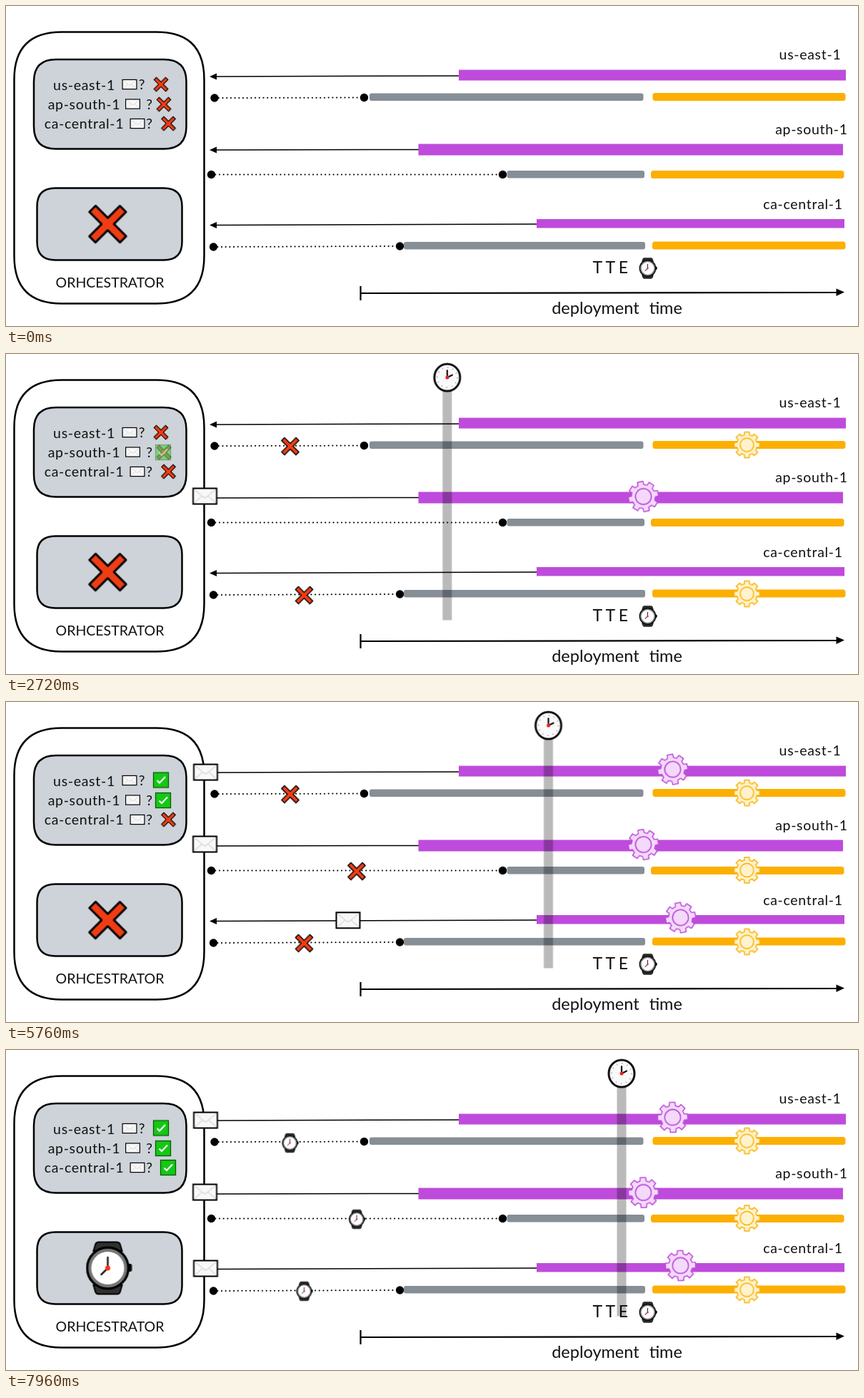
An HTML page that plays this animation: 1193 px wide and 449 px high, repeating every 8000 ms.

```html
<!DOCTYPE html>
<html lang="en">
<head>
<meta charset="utf-8">
<title>Deployment timeline</title>
<style>
html, body { margin: 0; width: 100%; height: 100%; overflow: hidden; background: #fff; }
svg { display: block; width: 1193px; height: 449px; }
text { font: 19.5px Lato, sans-serif; letter-spacing: .7px; text-anchor: middle; fill: #111; }
.caps { letter-spacing: 0; }
.tte { font-size: 23px; letter-spacing: 4.5px; }
.axis { font-size: 23.5px; letter-spacing: 0; word-spacing: 8px; }
.ink { fill: none; stroke: #000; }
.box { stroke: #000; stroke-width: 2.5; fill: #cdd3d8; }
.task { fill: #be4bdb; }
.wait { fill: #868e96; }
.done { fill: #fcaf00; }
.dots { fill: none; stroke: #000; stroke-width: 2; stroke-linecap: round; stroke-dasharray: .2 5.5; }
.gold { fill: #fff3cd; stroke: #fab005; }
.plum { fill: #f3d9fa; stroke: #be4bdb; }

/* Every animation shares one 8 s cycle. */
.a { animation: 8s linear infinite both; }
.spin { animation: spin 8s linear infinite; }
@keyframes spin { to { transform: rotate(360deg); } }

.clock { animation-name: sweep, clock-in; }
@keyframes sweep { from { transform: translateX(491px); } to { transform: translateX(863.8px); } }
@keyframes clock-in { 0%, .4% { opacity: 0; } 5.5%, 100% { opacity: 1; } }

.us-x { animation-name: us-x; }
.us-gold { animation-name: us-gold; }
.ca-x { animation-name: ca-x; }
.ca-gold { animation-name: ca-gold; }
.ap-x { animation-name: ap-x; }
.ap-gold { animation-name: ap-gold; }
@keyframes us-x { 0%, 1.6% { opacity: 0; } 6.6%, 100% { opacity: 1; } }
@keyframes us-gold { 0%, 4.6% { opacity: 0; } 9.6%, 100% { opacity: 1; } }
@keyframes ca-x { 0%, 13% { opacity: 0; } 18%, 100% { opacity: 1; } }
@keyframes ca-gold { 0%, 16% { opacity: 0; } 21%, 100% { opacity: 1; } }
@keyframes ap-x { 0%, 55.2% { opacity: 0; } 60.2%, 100% { opacity: 1; } }
@keyframes ap-gold { 0%, 58.2% { opacity: 0; } 63.7%, 100% { opacity: 1; } }

.ap-on { animation-name: ap-on; }
.us-on { animation-name: us-on; }
.ca-on { animation-name: ca-on; }
@keyframes ap-on { 0%, 13.9% { opacity: 0; } 20.1%, 100% { opacity: 1; } }
@keyframes us-on { 0%, 34.2% { opacity: 0; } 40.5%, 100% { opacity: 1; } }
@keyframes ca-on { 0%, 59.6% { opacity: 0; } 65.9%, 100% { opacity: 1; } }

.ap-mail { animation-name: ap-mail, ap-on; }
.us-mail { animation-name: us-mail, us-on; }
.ca-mail { animation-name: ca-mail, ca-on; }
.mail { animation-timing-function: cubic-bezier(.35, 0, .65, 1), linear; }
@keyframes ap-mail { 0%, 20.1% { transform: translate(577px, 199.5px); } 31.4%, 100% { transform: translate(278.5px, 199.5px); } }
@keyframes us-mail { 0%, 40.8% { transform: translate(634px, 97px); } 52%, 100% { transform: translate(279.5px, 98.5px); } }
@keyframes ca-mail { 0%, 65.9% { transform: translate(743.5px, 306px); } 77.1%, 100% { transform: translate(279.5px, 306.5px); } }

.ap-ok { animation-name: ap-ok; }
.us-ok { animation-name: us-ok; }
.ca-ok { animation-name: ca-ok; }
@keyframes ap-ok { 0%, 31.4% { opacity: 0; } 37.6%, 100% { opacity: 1; } }
@keyframes us-ok { 0%, 51.8% { opacity: 0; } 58%, 100% { opacity: 1; } }
@keyframes ca-ok { 0%, 76.6% { opacity: 0; } 82.6%, 100% { opacity: 1; } }

.ap-no { animation-name: ap-no; }
.us-no { animation-name: us-no; }
.ca-no { animation-name: ca-no; }
@keyframes ap-no { 0%, 31.4% { opacity: 1; } 37.6%, 100% { opacity: 0; } }
@keyframes us-no { 0%, 51.8% { opacity: 1; } 58%, 100% { opacity: 0; } }
@keyframes ca-no { 0%, 76.6% { opacity: 1; } 82.6%, 100% { opacity: 0; } }
</style>
</head>
<body>
<svg viewBox="0 0 1193 449">
  <defs>
    <path id="cross" transform="rotate(45)" fill="#f03c14" stroke="#000" stroke-width="5.5" stroke-linejoin="round"
      d="M-11-55H11V-11H55V11H11V55H-11V11H-55V-11H-11Z"/>
    <g id="check">
      <rect x="-10.5" y="-10.5" width="21" height="21" fill="#14c814" stroke="#0b5a0b" stroke-width="1.3"/>
      <path d="M-5.5 .5L-2 4L6-4.5" fill="none" stroke="#fff" stroke-width="2.2"/>
    </g>
    <g id="mail">
      <rect x="-16.5" y="-11" width="33" height="22" fill="#f8f8f8" stroke="#000" stroke-width="2"/>
      <path d="M-15-9.5L-2 1.5Q0 3 2 1.5L15-9.5M-15 9.5L-4.5 0M15 9.5L4.5 0" fill="none" stroke="#c4c4c4"/>
    </g>
    <g id="watch">
      <path d="M-13-36.5H13Q17-36.5 18-31L20-24H-20L-18-31Q-17-36.5-13-36.5ZM-13 36.5H13Q17 36.5 18 31L20 24H-20L-18 31Q-17 36.5-13 36.5Z"
        fill="#303030" stroke="#000" stroke-width="2"/>
      <rect x="26" y="-6" width="7.5" height="11" rx="2"/>
      <circle r="29" fill="#333" stroke="#000" stroke-width="3"/>
      <circle r="25" fill="#fff" stroke="#777" stroke-width="4"/>
      <path d="M0 0V-15M0 0L-9 9" stroke="#222" stroke-width="2.6" stroke-linecap="round"/>
      <circle r="3.5" fill="#f8301c"/>
    </g>
    <g id="gear">
      <path id="teeth"/>
      <circle r="9.5"/>
    </g>
    <path id="head" d="M0 0L10-4.5V4.5Z"/>
  </defs>

  <path class="box" style="fill:#fff"
    d="M78 36.5H211Q277.500 36.500 277.500 103V351Q277.500 417.500 211 417.500H78Q11.500 417.500 11.500 351V103Q11.500 36.500 78 36.500Z"/>
  <path class="box" d="M70 75H221Q252.500 75 252.500 106V169Q252.500 200.500 221 200.500H70Q39 200.500 39 169V106Q39 75 70 75Z"/>
  <path class="box" d="M69 255.500H221Q246.500 255.500 246.500 281V331Q246.500 356.500 221 356.500H69Q43.500 356.500 43.500 331V281Q43.500 255.500 69 255.500Z"/>
  <text x="145.5" y="394.5" class="caps">ORHCESTRATOR</text>

  <text x="109.5" y="117.5">us-east-1</text>
  <text x="109.5" y="145">ap-south-1</text>
  <text x="109.5" y="172">ca-central-1</text>
  <text x="190.5" y="117">?</text>
  <text x="201" y="144.5">?</text>
  <text x="201" y="171.5">?</text>
  <use href="#mail" transform="translate(173 110)scale(.6)"/>
  <use href="#mail" transform="translate(177.5 137.5)scale(.6)"/>
  <use href="#mail" transform="translate(184 165)scale(.6)"/>

  <text x="1126" y="75">us-east-1</text>
  <text x="1128" y="179.5">ap-south-1</text>
  <text x="1116" y="285">ca-central-1</text>

  <path class="ink" stroke-width="1.5" d="M634 98L290 99M578 201.5L290 202M744 306L290 307.5"/>
  <use href="#head" x="285" y="99"/>
  <use href="#head" x="285" y="202"/>
  <use href="#head" x="285" y="307.5"/>

  <path class="dots" d="M292 129L502 128.5M287.5 236.5H695.5M290.5 338L551.5 337"/>
  <g>
    <circle cx="292" cy="129" r="5.7"/><circle cx="501.5" cy="128.5" r="5.7"/>
    <circle cx="287.5" cy="236.5" r="5.7"/><circle cx="695.5" cy="236.5" r="5.7"/>
    <circle cx="290.5" cy="338" r="5.7"/><circle cx="551.5" cy="337" r="5.7"/>
  </g>

  <g class="task">
    <rect x="634" y="89.5" width="542" height="15"/>
    <rect x="577.5" y="193.5" width="594.5" height="16"/>
    <rect x="743" y="299" width="431" height="12.5"/>
  </g>
  <g class="wait">
    <rect x="509" y="122.5" width="383.5" height="10.5" rx="3"/>
    <rect x="701.5" y="231" width="192.5" height="10.5" rx="3"/>
    <rect x="557" y="331" width="338" height="10.5" rx="3"/>
  </g>
  <g class="done">
    <rect x="905.5" y="122" width="270" height="11" rx="3.5"/>
    <rect x="903" y="231" width="270.5" height="11" rx="3.5"/>
    <rect x="905" y="330.5" width="270.5" height="11" rx="3.5"/>
  </g>

  <text x="848.5" y="375" class="tte">TTE</text>
  <use href="#watch" transform="translate(898.5 368)scale(.39)"/>
  <path class="ink" stroke-width="2.2" d="M496.5 393V413M496.5 403L1166 402"/>
  <path d="M1174 401.5L1162.5 396.5V407Z"/>
  <text x="855.5" y="432" class="axis">deployment time</text>

  <g class="a clock">
    <rect x="-6.5" y="50" width="13" height="323.5" fill="#000" fill-opacity=".27"/>
    <ellipse cy="33" rx="18" ry="19" fill="#fafafa" stroke="#111" stroke-width="3"/>
    <circle cy="33" r="14" fill="none" stroke="#999" stroke-width="2" stroke-dasharray="1 6.33"/>
    <path d="M0 33V23M0 33L7 29.5" stroke="#111" stroke-width="2.2" stroke-linecap="round"/>
    <circle cy="33" r="2.5" fill="#f01e1e"/>
  </g>

  <g transform="translate(217 110)scale(.21)"><g class="a us-no"><use href="#cross"/></g></g>
  <g transform="translate(221 138)scale(.21)"><g class="a ap-no"><use href="#cross"/></g></g>
  <g transform="translate(227.5 165)scale(.21)"><g class="a ca-no"><use href="#cross"/></g></g>
  <g transform="translate(217 109.5)"><use href="#check" class="a us-ok"/></g>
  <g transform="translate(220 138)"><use href="#check" class="a ap-ok"/></g>
  <g transform="translate(227 165)"><use href="#check" class="a ca-ok"/></g>

  <g transform="translate(142.5 306)">
    <g class="a ca-ok"><use href="#watch"/></g>
    <g class="a ca-no"><use href="#cross" transform="scale(.55)"/></g>
  </g>
  <g transform="translate(398 129.5)">
    <g class="a ca-ok"><use href="#watch" transform="translate(-.5 1)scale(.36)"/></g>
    <g class="a ca-no"><use href="#cross" class="a us-x" transform="scale(.26)"/></g>
  </g>
  <g transform="translate(491 237.5)">
    <g class="a ca-ok"><use href="#watch" transform="scale(.36)"/></g>
    <g class="a ca-no"><use href="#cross" class="a ap-x" transform="scale(.26)"/></g>
  </g>
  <g transform="translate(417.5 338.5)">
    <g class="a ca-ok"><use href="#watch" transform="scale(.36)"/></g>
    <g class="a ca-no"><use href="#cross" class="a ca-x" transform="scale(.26)"/></g>
  </g>

  <g class="gold" stroke-width="1.5">
    <g transform="translate(1037.5 127.5)"><use href="#gear" class="a us-gold"/></g>
    <g transform="translate(1037.5 236)"><use href="#gear" class="a ap-gold"/></g>
    <g transform="translate(1037.5 336.5)"><use href="#gear" class="a ca-gold"/></g>
  </g>
  <g class="plum" stroke-width="1.3">
    <g transform="translate(933.5 94.5)scale(1.17)"><g class="a us-on"><use href="#gear" class="spin"/></g></g>
    <g transform="translate(892.5 200)scale(1.17)"><g class="a ap-on"><use href="#gear" class="spin"/></g></g>
    <g transform="translate(944.5 302.5)scale(1.17)"><g class="a ca-on"><use href="#gear" class="spin"/></g></g>
  </g>

  <use href="#mail" class="a mail us-mail"/>
  <use href="#mail" class="a mail ap-mail"/>
  <use href="#mail" class="a mail ca-mail"/>
</svg>
<script>
// Gear outline: eight tapered teeth, each given as [radius, angle] corners.
const tooth = [[14.3, -14.5], [18.3, -10.5], [18.3, 10.5], [14.3, 14.5]];
const points = [];
for (let i = 0; i < 8; i++) {
  for (const [r, deg] of tooth) {
    const a = (i * 45 + deg) * Math.PI / 180;
    points.push((r * Math.sin(a)).toFixed(2) + " " + (-r * Math.cos(a)).toFixed(2));
  }
}
const teeth = document.getElementById("teeth");
teeth.setAttribute("d", "M" + points.join("L") + "Z");
teeth.setAttribute("stroke-linejoin", "round");
</script>
</body>
</html>
```
